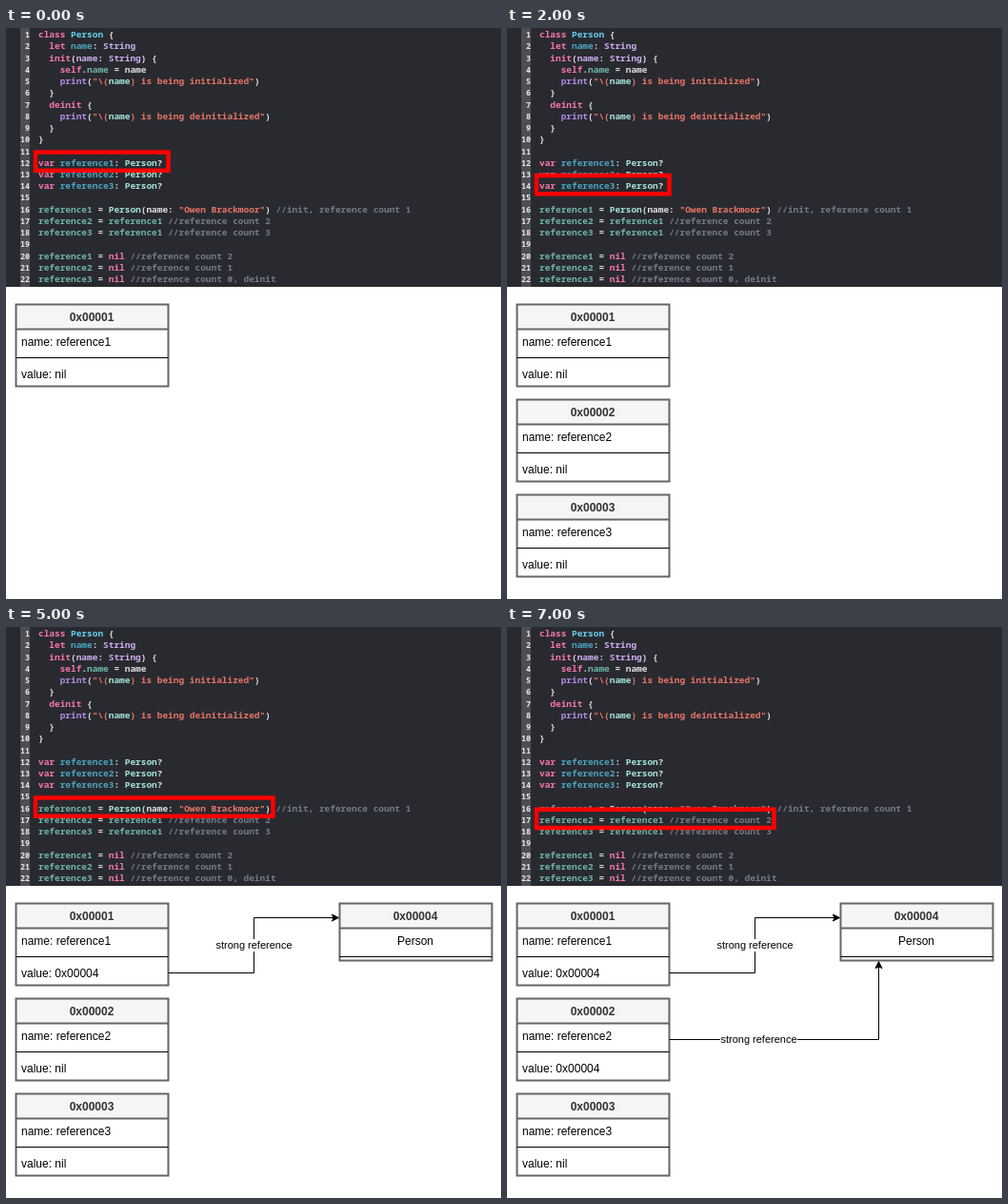
An HTML page for the animation above (8 s loop, 520 px wide and 600 px high).

```html
<!DOCTYPE html>
<html lang="en">
<head>
<meta charset="utf-8">
<title>Strong references</title>
<style>
html, body { margin: 0; width: 100%; height: 100%; overflow: hidden; background: #fff; }
svg { display: block; }
text { white-space: pre; }
.code { font: 600 9.46px "Noto Sans Mono", "DejaVu Sans Mono", monospace; fill: #dfdfe0; }
.num { font: 600 8.4px "Noto Sans Mono", "DejaVu Sans Mono", monospace; fill: #e6e6e8; text-anchor: end; }
.k { fill: #f577ab; } .d { fill: #66cfee; } .v { fill: #4ba6c0; } .t { fill: #cdaeee; }
.f { fill: #b08ae0; } .s { fill: #e87566; } .m { fill: #70b5a7; } .p { fill: #a6e4d7; } .c { fill: #747b85; }
.diagram { font: 12px "Liberation Sans", Arial, sans-serif; fill: #000; }
.head { font-weight: bold; fill: #333; }
.mid { text-anchor: middle; }
.label { font-size: 11px; text-anchor: middle; }
.wire { fill: none; stroke: #000; }
.frame { fill: none; stroke: #666; stroke-width: 2; }
</style>
</head>
<body>
<svg id="stage" width="520" height="600" viewBox="0 0 520 600">
  <rect width="520" height="272" fill="#292a30"/>
  <rect x="15" width="10" height="272" fill="#4d4e53"/>
  <g id="code"></g>
  <rect id="mark" x="31" height="19.3" fill="none" stroke="#f00" stroke-width="4.5"/>
  <g id="diagram" class="diagram"></g>
</svg>
<script>
const NS = "http://www.w3.org/2000/svg";
const PITCH = 12.24;
const byId = id => document.getElementById(id);

function add(parent, tag, attrs, text) {
  const el = document.createElementNS(NS, tag);
  for (const key in attrs) el.setAttribute(key, attrs[key]);
  if (text !== undefined) el.textContent = text;
  parent.appendChild(el);
  return el;
}

// Coloured runs are written <style|text>; the rest is plain.
const lines = [
  "<k|class> <d|Person> {",
  "  <k|let> <v|name>: <t|String>",
  "  <k|init>(<t|name>: <t|String>) {",
  "    <k|self>.<m|name> = name",
  "    <f|print>(<s|\"\\(><p|name><s|) is being initialized\">)",
  "  }",
  "  <k|deinit> {",
  "    <f|print>(<s|\"\\(><p|name><s|) is being deinitialized\">)",
  "  }",
  "}",
  "",
  ...[1, 2, 3].map(n => `<k|var> <v|reference${n}>: <p|Person>?`),
  "",
  "<m|reference1> = <p|Person>(name: <s|\"Owen Brackmoor\">) <c|//init, reference count 1>",
  ...[2, 3].map(n => `<m|reference${n}> = <m|reference1> <c|//reference count ${n}>`),
  "",
  ...[1, 2, 3].map(n => `<m|reference${n}> = <k|nil> <c|//reference count ${3 - n}${n === 3 ? ", deinit" : ""}>`)
];

lines.forEach((line, i) => {
  const y = 10.1 + i * PITCH;
  add(byId("code"), "text", { class: "num", x: 25, y }, i + 1);
  const row = add(byId("code"), "text", { class: "code", x: 34, y });
  for (const [, style, run, plain] of line.matchAll(/<(\w)\|([^>]*)>|([^<]+)/g))
    add(row, "tspan", style ? { class: style } : {}, style ? run : plain);
});

const diagram = byId("diagram");

function card(x, y, h, title) {
  const g = add(diagram, "g", { transform: `translate(${x} ${y})` });
  add(g, "rect", { width: 160, height: 26, fill: "#f5f5f5" });
  add(g, "path", { class: "frame", d: `M0 0H160V${h}H0ZM0 26H160` });
  add(g, "path", { class: "wire", d: "M0 56H160" });
  add(g, "text", { class: "head mid", x: 79.5, y: 17.5 }, title);
  return g;
}

function variable(n) {
  const g = card(10.5, 190.5 + n * 100, 86, "0x0000" + n);
  add(g, "text", { x: 5.5, y: 43.5 }, "name: reference" + n);
  return { g, value: add(g, "text", { x: 5.5, y: 77.5 }) };
}

function arrow(path, tip, x, y) {
  const g = add(diagram, "g", {});
  add(g, "path", { class: "wire", d: path });
  add(g, "path", { d: "M0 0L-7 3.5L-5.25 0L-7 -3.5Z", stroke: "#000", transform: tip });
  add(g, "rect", { x: x - 40.5, y: y - 10, width: 81, height: 13, fill: "#fff" });
  add(g, "text", { class: "label", x, y }, "strong reference");
  return g;
}

const vars = [1, 2, 3].map(variable);
const person = card(350.5, 290.5, 60, "0x00004");
add(person, "text", { class: "mid", x: 79.5, y: 43.5 }, "Person");
const arrows = [
  arrow("M170.5 363.5H260.5V305.5H344", "translate(349.4 305.5)", 260.5, 338),
  arrow("M170.5 433.5H390.5V357", "translate(390.5 351.6) rotate(-90)", 264.5, 437)
];

const show = (el, on) => el.setAttribute("visibility", on ? "visible" : "hidden");
const mark = byId("mark");
const markedLines = [12, 13, 14, 16, 16, 16, 17, 17];

function draw(ms) {
  const step = Math.floor(ms / 1000) % 8;
  mark.setAttribute("y", 130.5 + (markedLines[step] - 12) * PITCH);
  mark.setAttribute("width", step < 3 ? 139.5 : 249.5);
  vars.forEach(({ g, value }, i) => {
    show(g, step >= i);
    const bound = i < 2 && step >= 4 + i * 2;
    value.textContent = "value: " + (bound ? "0x00004" : "nil");
  });
  show(person, step >= 3);
  arrows.forEach((el, i) => show(el, step >= 5 + i * 2));
}

const start = performance.now();
function tick() {
  draw((performance.now() - start) % 8000);
  requestAnimationFrame(tick);
}
tick();
</script>
</body>
</html>
```
